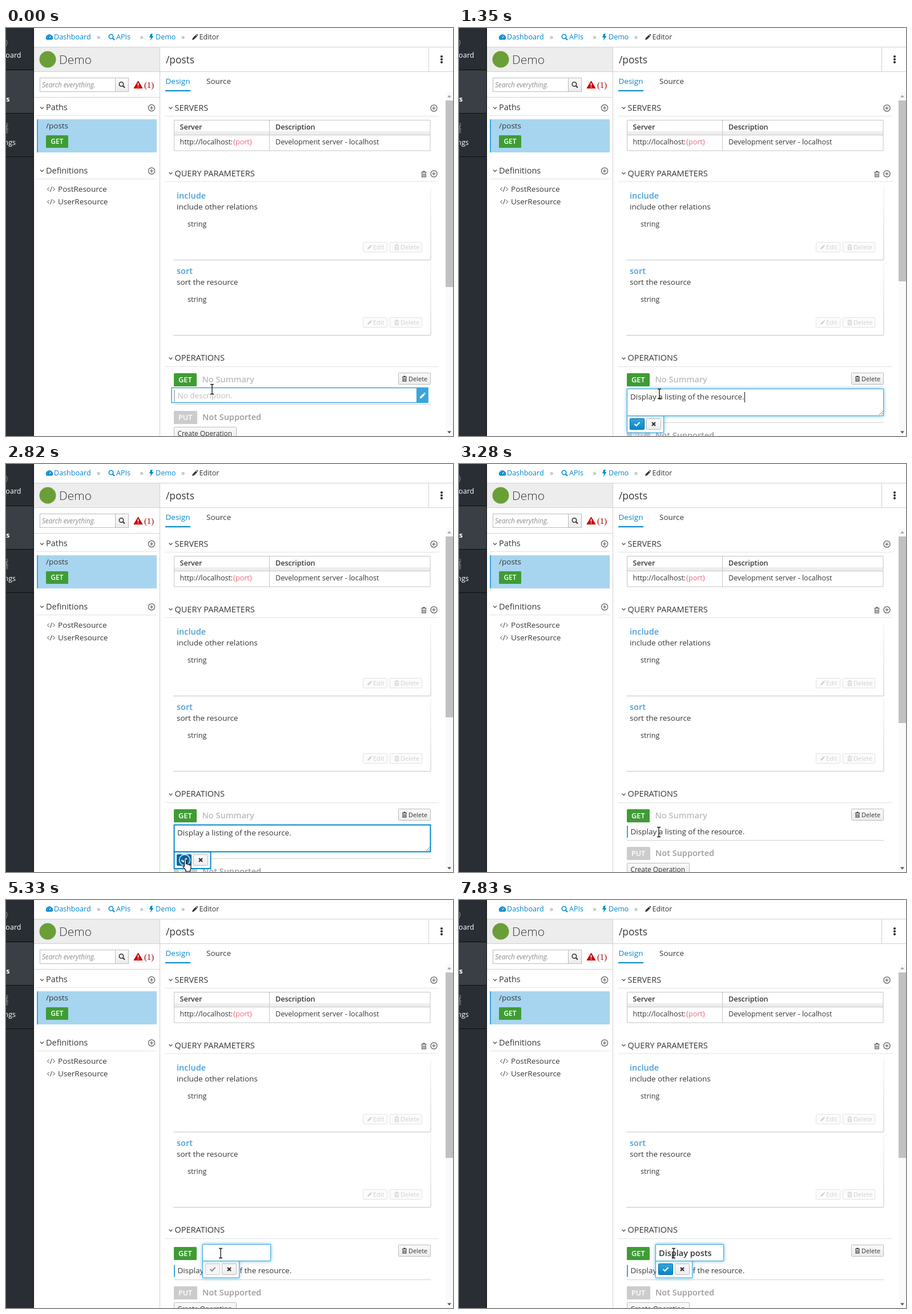
Write an HTML page that moves like this. It is 783x715 px and loops after 8000 ms.

```html
<!DOCTYPE html>
<html lang="en">
<head>
<meta charset="utf-8">
<title>API editor</title>
<style>
html, body { margin: 0; width: 100%; height: 100%; overflow: hidden; background: #fff; }
svg { display: block; width: 783px; height: 715px; font: 13.5px "Open Sans", sans-serif; fill: #363636; color: #363636; }
text { white-space: pre; }
.s { font-size: 12.55px; }
.xs { font-size: 11px; }
.h { font-size: 14.5px; font-weight: 500; }
.b { font-weight: 600; font-size: 14.5px; }
.w { font-weight: 600; fill: #fff; }
.link { fill: #0088ce; color: #0088ce; }
.sky { fill: #4a9fd4; }
.mute { fill: #bbb; color: #bbb; }
.off { fill: #d0d0d0; color: #d0d0d0; }
.icon { color: #5c5854; }
.line { stroke: #d1d1d1; fill: none; }
.dots { stroke: #c4c4c4; stroke-dasharray: 1 1; fill: none; }
.box { fill: #fff; stroke: #bbb; }
.blue { stroke: #39a5dc; }
.strong { stroke: #0088ce; stroke-width: 2; }
.glow { filter: drop-shadow(0 0 3px rgba(57, 165, 220, .75)); }
.o { fill: none; stroke: currentColor; }
.f { fill: currentColor; }
</style>
</head>
<body>
<svg viewBox="0 0 783 715">
<defs>
  <linearGradient id="grey" x2="0" y2="1"><stop stop-color="#fafafa"/><stop offset="1" stop-color="#ededed"/></linearGradient>
  <linearGradient id="primary" x2="0" y2="1"><stop stop-color="#39a5dc"/><stop offset="1" stop-color="#0088ce"/></linearGradient>
  <linearGradient id="fade" x2="0" y2="1"><stop stop-color="#eee"/><stop offset="1" stop-color="#c4c4c4"/></linearGradient>
  <path id="angle" class="o" stroke-width="1.4" d="M-3-1.5 0 1.5 3-1.5"/>
  <g id="plus" class="o" stroke-width="1.2"><circle r="5.6"/><path d="M-3 0H3M0-3V3"/></g>
  <g id="search" class="o"><circle cx="-1" cy="-1" r="3.7" stroke-width="1.6"/><path d="M2 2 5 5" stroke-width="2.2"/></g>
  <path id="bolt" class="f" d="M-1-6H2.5L1-2H4L-2 6.5-.5.5H-3.5Z"/>
  <path id="pencil" class="f" d="M-5 5-4 1.6 1.6-4 4-1.6-1.6 4ZM2.3-4.7 3.2-5.4Q4-5.6 5.2-4.3 5.6-3.5 4.7-2.3Z"/>
  <g id="trash"><path class="f" d="M-4.5-4H-2L-1.3-5.5H1.3L2-4H4.5V-2.7H-4.5Z"/><path class="o" stroke-width="1.2" d="M-3.3-2.5V4.9H3.3V-2.5M-1.2-1V3.4M1.2-1V3.4"/></g>
  <path id="code" class="o" d="M-3.5-3-6.5 0-3.5 3M3.5-3 6.5 0 3.5 3M1.5-4.5-1.5 4.5"/>
  <g id="gauge"><path class="f" d="M-5 4.5A6 6 0 1 1 5 4.5Z"/><path d="M0 2 2-2M-4 1H-3M3 1H4M-2.6-2.3-2-1.7M-.4-3.4H.4" stroke="#fff" stroke-width="1.2"/></g>
  <g id="cog" class="o"><circle r="4.5" stroke-width="2.5"/><circle r="6.8" stroke-width="2.2" stroke-dasharray="2.6 2.74"/></g>
  <g id="section"><use href="#angle" x="288.5" class="icon"/><path class="dots" d="M279 14.5H759"/></g>
  <g id="card">
    <path d="M293 126.5H744" stroke="#c4c4c4"/>
    <rect x="743.5" width="1" height="126" fill="url(#fade)"/>
    <text class="s" x="318" y="68">string</text>
    <g class="off" stroke="none">
      <rect x="625.5" y="95.5" width="42" height="17" rx="1" fill="#fcfcfc" stroke="#e2e2e2"/>
      <rect x="672.5" y="95.5" width="56" height="17" rx="1" fill="#fcfcfc" stroke="#e2e2e2"/>
      <use href="#pencil" transform="translate(637 104)scale(.8)"/><text class="xs" x="643" y="108">Edit</text>
      <use href="#trash" transform="translate(684.5 104)scale(.9)"/><text class="xs" x="691" y="108">Delete</text>
    </g>
  </g>
</defs>

<rect width="783" height="715" fill="#fff"/>

<!-- side navigation -->
<rect width="49" height="715" fill="#292e34"/>
<rect y="74" width="49" height="75" fill="#393f44"/>
<path d="M0 73.5H49M0 149.5H49M0 225.5H49M48.5 0V715" stroke="#0b0d0f"/>
<g class="s" fill="#fff" text-anchor="end">
  <text x="26.5" y="52">Dashboard</text>
  <text x="6.5" y="128.5" font-weight="700">APIs</text>
  <text x="17" y="204.5">Settings</text>
</g>
<g color="#72767b">
  <circle class="o" cx="-6" cy="26" r="8" stroke-width="1.4"/>
  <use href="#cog" x="-4" y="176"/>
  <use href="#cog" transform="translate(1 169)scale(.4)"/>
  <use href="#cog" transform="translate(1 182)scale(.4)"/>
</g>

<!-- breadcrumb -->
<g class="s link">
  <use href="#gauge" x="76" y="16"/><text x="84" y="20">Dashboard</text>
  <use href="#search" x="185" y="16"/><text x="193" y="20">APIs</text>
  <use href="#bolt" x="254.5" y="16"/><text x="262" y="20">Demo</text>
</g>
<g class="s" fill="#8b8d8f"><text x="159" y="20">»</text><text x="234.5" y="20">»</text><text x="307" y="20">»</text></g>
<use href="#pencil" x="331" y="16"/><text class="s" x="338.5" y="20">Editor</text>

<!-- left panel -->
<rect x="49" y="34" width="220" height="42" fill="#ededed"/>
<path class="line" d="M49 33.5H783M49 76.5H783M269.5 34V715M740.5 34V76M49 121.5H269"/>
<circle cx="73" cy="55" r="14.5" fill="#6a9f38"/>
<text x="93" y="63" font-size="20.9" font-weight="300">Demo</text>
<rect class="box" x="59.5" y="87.5" width="132" height="24"/>
<rect x="191.5" y="87.5" width="23" height="24" fill="url(#grey)" stroke="#bbb"/>
<use href="#search" x="203" y="99.5"/>
<text x="63" y="104" font-size="11.7" font-style="italic" fill="#8b8d8f">Search everything.</text>
<path d="M231.5 93 239 105.5H224Z" fill="#c00" stroke="#c00" stroke-linejoin="round"/>
<path d="M231.5 96.5V101M231.5 102.5V104.3" stroke="#fff" stroke-width="1.7"/>
<text x="242" y="105" font-size="14.6" font-family="Liberation Serif, serif" fill="#a30000">(1)</text>
<g class="icon">
  <use href="#angle" x="63" y="140"/><use href="#plus" x="255" y="140"/>
  <use href="#angle" x="63" y="250"/><use href="#plus" x="255" y="250.5"/>
</g>
<path class="dots" d="M54 153.5H264M54 264.5H264"/>
<text class="h" x="70" y="144">Paths</text>
<rect x="54" y="160" width="210" height="58" fill="#a7d5ef"/>
<rect x="54" y="160" width="2" height="58" fill="#39a5dc"/>
<text x="70" y="176">/posts</text>
<rect x="70" y="188" width="39" height="22" rx="1.5" fill="#3f9c35"/>
<text class="w" x="78.5" y="203" font-size="11.8">GET</text>
<text class="h" x="70" y="255">Definitions</text>
<use href="#code" x="79" y="282.5"/><text x="91" y="286.5">PostResource</text>
<use href="#code" x="79" y="304.5"/><text x="91" y="308.5">UserResource</text>

<!-- main panel -->
<text x="280" y="61.5" font-size="17.3">/posts</text>
<g fill="#222"><circle cx="763" cy="50" r="2"/><circle cx="763" cy="55" r="2"/><circle cx="763" cy="60" r="2"/></g>
<text class="link" x="279.5" y="98">Design</text><text x="351" y="98">Source</text>
<rect x="279" y="109" width="44" height="2" fill="#0088ce"/>

<use href="#section" y="140"/><text class="h" x="295.5" y="145">SERVERS</text>
<use href="#plus" class="icon" x="749.5" y="140.5"/>
<rect x="294" y="181" width="449" height="6" fill="#eee"/>
<path d="M294.5 161.5H743V215H294.5ZM294 187.5H743M461.5 161V215" fill="none" stroke="#c4c4c4"/>
<g class="s">
  <g font-weight="600"><text x="304.5" y="178">Server</text><text x="472" y="178">Description</text></g>
  <text x="304.5" y="204">http://localhost:<tspan fill="#f0647d">{port}</tspan></text>
  <text x="472" y="204">Development server - localhost</text>
</g>

<use href="#section" y="254.5"/><text class="h" x="295.5" y="259.5">QUERY PARAMETERS</text>
<use href="#trash" class="icon" x="732" y="256"/><use href="#plus" class="icon" x="749.5" y="255.5"/>
<use href="#card" y="280"/><text class="b sky" x="299" y="299">include</text><text x="299" y="318">include other relations</text>
<use href="#card" y="412"/><text class="b sky" x="299" y="431">sort</text><text x="299" y="450">sort the resource</text>

<use href="#section" y="579"/><text class="h" x="295.5" y="583">OPERATIONS</text>
<g id="verb">
  <rect x="294" y="605" width="40" height="23" rx="1.5" fill="#3f9c35"/>
  <text class="w" x="302" y="621" font-size="12.8">GET</text>
</g>
<text id="noSummary" class="b mute" x="343.5" y="621">No Summary</text>
<rect x="687.5" y="604.5" width="56" height="20" rx="1" fill="url(#grey)" stroke="#bbb"/>
<use href="#trash" transform="translate(698 614.5)scale(.9)"/><text class="xs" x="705" y="618.5">Delete</text>

<g id="detail">
  <rect id="bar" x="294" y="634" width="2" height="21" fill="#bbb"/>
  <text id="description" x="300.5" y="648.5"></text>
</g>
<g id="hover">
  <rect class="blue" x="290" y="630.5" width="449" height="26" fill="none" stroke-width="1.5"/>
  <rect x="719" y="630" width="20.5" height="27" fill="#39a5dc"/>
  <use href="#pencil" x="729.5" y="644.5" color="#fff"/>
</g>
<g id="below">
  <path class="line" d="M294 659.5H744"/>
  <rect x="294" y="671" width="41" height="23" rx="1.5" fill="#ccc"/>
  <text class="w" x="302" y="687" font-size="12.6">PUT</text>
  <text class="b" x="344" y="687" fill="#9c9c9c">Not Supported</text>
  <rect x="294.5" y="699.5" width="109" height="21" rx="1" fill="url(#grey)" stroke="#bbb"/>
  <text x="300.5" y="715" font-size="11.9">Create Operation</text>
</g>

<!-- inline editor -->
<g id="editor">
  <g id="popover">
    <rect id="frame" x=".5" y="-.5" width="64" height="29.5"/>
    <rect id="ok" x="5.5" y="4.5" width="25" height="19" rx="1"/>
    <path id="tick" d="M13.5 14 16.7 17 22.5 11" fill="none" stroke-width="2.3"/>
    <rect x="34.5" y="4.5" width="25" height="19" rx="1" fill="url(#grey)" stroke="#bbb"/>
    <path d="M44 11 50 17M50 11 44 17" stroke="#333" stroke-width="2.3"/>
  </g>
  <rect id="field"/>
  <path id="grip" d="M736 678 743 671M740 678 743 675" stroke="#777"/>
  <text id="typed"></text>
  <rect id="caret" width="1" fill="#111"/>
</g>

<!-- scrollbar -->
<rect x="770" y="113" width="13" height="602" fill="#fafafa"/>
<rect id="thumb" x="770" y="127" width="13" fill="#c1c1c1"/>
<path d="M773 121.5 776.5 117.5 780 121.5Z" fill="#a3a3a3"/>
<path d="M773 706.5 776.5 710.5 780 706.5Z" fill="#505050"/>

<circle id="ring" cx="313" cy="694" r="9.5" fill="none" stroke="#d6ecf8" stroke-width="1.5"/>
<g id="cursor">
  <path id="beam" d="M-3-8.5H-1L0-7.5 1-8.5H3M0-7.5V7.5M-3 8.5H-1L0 7.5 1 8.5H3" fill="none" stroke="#111" stroke-width="1.3"/>
  <path id="hand" d="M-1.5 1Q0-1.5 1.5 1V7Q4 6 4.5 8 7 7 7.5 9 10 8.5 10 11V15L8.5 18V20H1V18L-4 11.5Q-4.5 9-1.5 11Z" fill="#fff" stroke="#111" stroke-width="1.2"/>
</g>
</svg>
<script>
const LOOP = 8000;
const SENTENCE = 'Display a listing of the resource.';
const $ = id => document.getElementById(id);
const set = (id, attrs) => { for (const k in attrs) $(id).setAttribute(k, attrs[k]); };
const show = (id, on) => { $(id).style.display = on ? '' : 'none'; };

// Layout of each mode: shift of the verb, the description and the rows below; end of the scroll thumb.
const LAYOUT = {
  view: { verb: 0, detail: 0, below: 0, thumb: 454 },
  body: { verb: 0, detail: 0, below: 32, thumb: 444, field: [294.5, 632.5, 449, 47], pop: [294, 680], text: [300, 651], caret: [638, 18], font: '' },
  title: { verb: 3, detail: 5.5, below: 6, thumb: 452, field: [344.5, 603.5, 119, 29], pop: [344, 633], text: [350, 623.5], caret: [609, 19], font: 'b' }
};

// Each step overrides part of the state that came before it.
const steps = [
  [0, { mode: 'view', text: '', caret: false, focus: false, hover: true, saved: false, press: false, hand: false, at: [361, 633] }],
  [130, { at: [398, 645] }], [270, { at: [432, 653] }], [400, { at: [358, 640] }],
  [800, { mode: 'body', hover: false, caret: true }], [940, { focus: true }],
  [1080, { at: [354, 641] }], [1210, { at: [351, 641] }], [1350, { text: SENTENCE }],
  [1750, { at: [350, 644] }], [1890, { at: [346, 653], caret: false }], [2020, { at: [339, 666] }],
  [2160, { at: [330, 679] }], [2290, { at: [321, 689], hand: true }],
  [2430, { at: [316, 693], caret: true }], [2560, { at: [314, 694] }],
  [2700, { focus: false, caret: false, press: true }],
  [2980, { mode: 'view', text: '', saved: true, press: false, hand: false, at: [315, 692] }],
  [3120, { at: [328, 673] }], [3270, { at: [350, 645] }], [3410, { at: [369, 626] }], [3560, { at: [376, 619] }],
  [3710, { mode: 'title', caret: true }], [3860, { focus: true }],
  [3980, { at: [410, 630] }], [4120, { at: [446, 642] }],
  [4250, { at: [376, 619], caret: false }], [4780, { caret: true }], [5330, { caret: false }],
  ...typing('Displa', '', 5470, 136),
  ...typing('y posts', 'Displa', 6430, 162),
  [7830, { caret: false }]
];

function typing(added, before, start, gap) {
  return [...added].map((_, i) => [start + i * gap, { text: before + added.slice(0, i + 1), caret: true }]);
}

function render(time) {
  const s = Object.assign({}, ...steps.filter(([at]) => at <= time).map(step => step[1]));
  const lay = LAYOUT[s.mode], editing = s.mode !== 'view', ready = s.text !== '';

  for (const id of ['verb', 'detail', 'below']) set(id, { transform: `translate(0 ${lay[id]})` });
  set('thumb', { height: lay.thumb - 127 });
  show('noSummary', s.mode !== 'title');
  show('detail', s.mode !== 'body');
  show('hover', s.hover);
  $('description').textContent = s.saved ? SENTENCE : 'No description.';
  set('description', { class: s.saved ? '' : 'mute' });
  set('bar', { fill: s.saved ? '#39a5dc' : '#bbb' });

  show('editor', editing);
  if (editing) {
    const [x, y, width, height] = lay.field;
    set('field', { x, y, width, height, class: 'box' + (s.press ? ' strong' : s.focus ? ' blue glow' : '') });
    set('popover', { transform: `translate(${lay.pop})` });
    set('frame', { class: 'box ' + (s.press ? 'strong' : 'blue glow') });
    set('ok', { fill: s.press ? '#00659c' : ready ? 'url(#primary)' : '#f5f5f5', stroke: ready ? '#00659c' : '#ccc' });
    set('tick', { stroke: ready ? '#fff' : '#8b8d8f' });
    show('grip', s.mode === 'body');
    $('typed').textContent = s.text;
    set('typed', { x: lay.text[0], y: lay.text[1], class: lay.font });
    const end = ready ? $('typed').getComputedTextLength() : 0.5;
    set('caret', { x: Math.round(lay.text[0] + end), y: lay.caret[0], height: lay.caret[1] });
    show('caret', s.caret);
  }

  show('ring', s.press);
  show('hand', s.hand);
  show('beam', !s.hand);
  set('cursor', { transform: `translate(${s.at})` });
}

const start = performance.now();
function tick() {
  render((performance.now() - start) % LOOP);
  requestAnimationFrame(tick);
}
tick();
</script>
</body>
</html>
```
